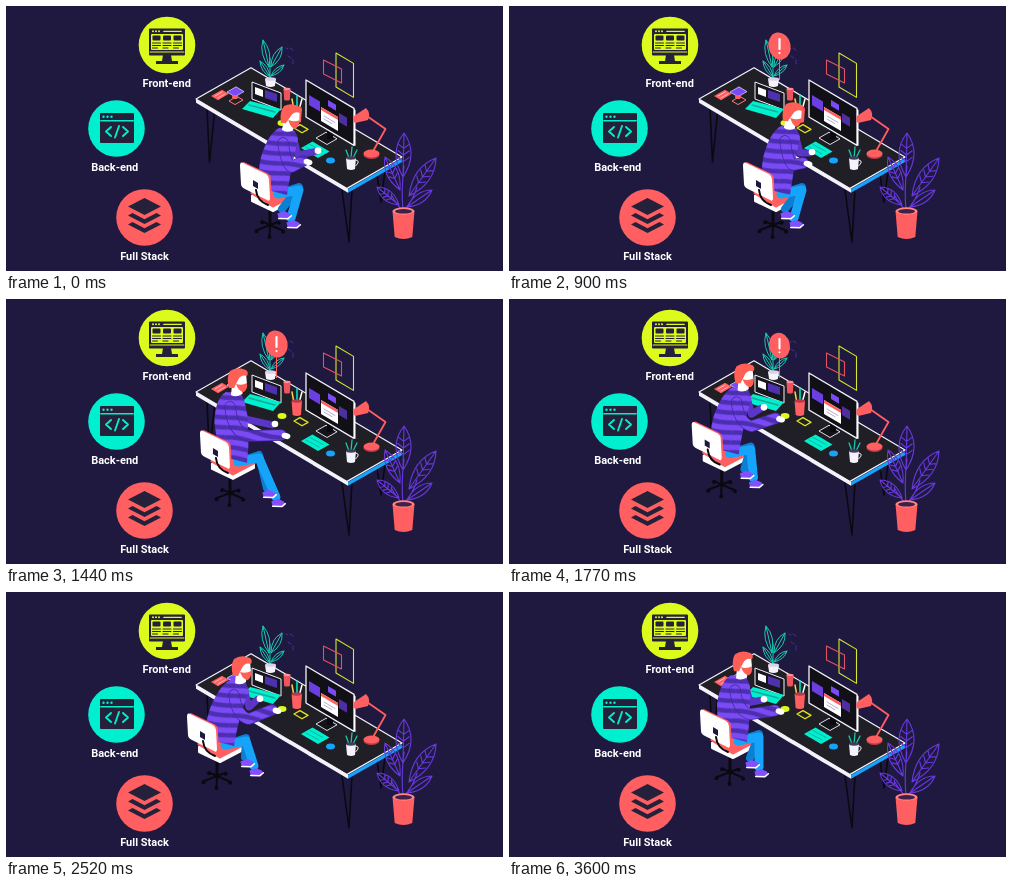
Recreate the animation shown at these times as an HTML page. Size 497 by 265 pixels, loop 3630 ms.

```html
<!DOCTYPE html>
<html lang="en">
<head>
<meta charset="utf-8">
<title>Developer at work</title>
<style>
html, body { margin: 0; width: 100%; height: 100%; overflow: hidden; background: #1f1940; }
svg { display: block; width: 100vw; height: 100vh; }
text { font-family: Roboto, Arial, sans-serif; font-weight: 600; font-size: 11px; fill: #fff; text-anchor: middle; }
.line { fill: none; stroke-linecap: round; stroke-linejoin: round; }
</style>
</head>
<body>
<svg viewBox="0 0 497 265">
  <defs>
    <pattern id="knit" width="60" height="10" patternUnits="userSpaceOnUse">
      <rect width="60" height="10" fill="#7a4af4"/>
      <path d="M0 4Q15 1 30 4T60 4" fill="none" stroke="#4c2eb0" stroke-width="4.5"/>
    </pattern>
  </defs>
  <g id="icons"></g>
  <g id="room"></g>
  <g id="alert">
    <path d="M0 12V34" stroke="#ff5f60"/>
    <ellipse rx="11" ry="13.7" transform="rotate(-12)" fill="#ff5f60"/>
    <path d="M0 -7V3M0 7v.1" class="line" stroke="#fff" stroke-width="2.2"/>
  </g>
  <g id="base"></g>
  <path id="legFar" class="line" stroke="#0b7fd2" stroke-width="8"/>
  <path id="legNear" class="line" stroke="#16a4fa" stroke-width="9"/>
  <g id="shoeFar"></g>
  <g id="shoeNear"></g>
  <path id="armFar" class="line" stroke="#5a35c8" stroke-width="7"/>
  <circle id="handFar" r="3.3" fill="#fff"/>
  <path id="torso" fill="url(#knit)"/>
  <path id="armEdge" class="line" stroke="#42289e" stroke-width="11.5"/>
  <path id="armNear" class="line" stroke="url(#knit)" stroke-width="10"/>
  <ellipse id="handNear" rx="4.5" ry="3" fill="#fff"/>
  <g id="head">
    <path d="M-6 6L-7 16Q-2 19 4 15L5 7L9 5 8 -6 -4 -7z" fill="#fff"/>
    <path d="M-9 9Q-12 -2 -8 -8Q-1 -13 8 -9Q11 -7 9 -3Q3 -5 0 1L-4 9Z" fill="#ff5f55"/>
    <path d="M-2 5Q4 7 9 4Q10 10 6 13Q1 13 -2 5Z" fill="#ff5f55"/>
  </g>
  <g id="back"></g>
</svg>
<script>
const LOOP = 3630;
const RED = '#ff5f60', TEAL = '#00efcf', LIME = '#dcfb1c', INK = '#26213a';
const VIOLET = '#7a4af4', WHITE = '#f4f2fa', BLACK = '#0a0910', BLUE = '#16a4fa';
const $ = id => document.getElementById(id);
const set = (id, name, value) => $(id).setAttribute(name, value);
const place = (id, x, y, more = '') => set(id, 'transform', `translate(${x} ${y})${more}`);
const clamp = v => Math.max(0, Math.min(1, v));

// Drawing helpers: each returns SVG markup.
const shape = (d, fill, edge = 'none', w = 1) =>
  `<path d="${d}" fill="${fill}" stroke="${edge}" stroke-width="${w}" stroke-linejoin="round"/>`;
const line = (d, color, w = 1) => `<path class="line" d="${d}" stroke="${color}" stroke-width="${w}"/>`;
const oval = (x, y, rx, ry, fill) => `<ellipse cx="${x}" cy="${y}" rx="${rx}" ry="${ry}" fill="${fill}"/>`;
const box = (x, y, w, h, fill) => `<rect x="${x}" y="${y}" width="${w}" height="${h}" rx="1" fill="${fill}"/>`;
const label = (x, y, s) => `<text x="${x}" y="${y}">${s}</text>`;
// A sheet lying on the desk, from its left corner.
const flat = (x, y, a, b, ...look) =>
  shape(`M${x} ${y}l${a} ${-.57 * a}l${b} ${.592 * b}l${-a} ${.57 * a}z`, ...look);
// An upright panel along the desk's long side.
const panel = (x, y, w, h, fill, edge, lw, k = .592) =>
  shape(`M${x} ${y}l${w} ${k * w}v${h}l${-w} ${-k * w}z`, fill, edge, lw);
const can = (x, y, w, h, fill, rim) =>
  shape(`M${x - w} ${y}h${2 * w}l${-w * .2} ${h}q${-w * .8} ${w * .35} ${-w * 1.6} 0z`, fill) +
  oval(x, y, w, w * .33, rim);

function leaf(x, y, tx, ty, w) {
  const dx = tx - x, dy = ty - y, len = Math.hypot(dx, dy);
  const nx = -dy / len * w, ny = dx / len * w;
  const at = (k, s) => `${x + dx * k + nx * s} ${y + dy * k + ny * s}`;
  let d = `M${at(0, 0)}Q${at(.55, 1)} ${at(1, 0)}Q${at(.55, -1)} ${at(0, 0)}L${at(1, 0)}`;
  if (w > 9) for (const k of [.35, .5, .65])
    d += `M${at(k + .1, .38)}L${at(k, 0)}L${at(k + .1, -.38)}`;
  return d;
}

const dots = (x, y, gap, r, fill) => [0, 1, 2].map(i => oval(x + i * gap, y, r, r, fill)).join('');
const badge = (x, y, fill) => oval(x, y, 28.3, 28.3, fill);
const card = x => box(x, 29.5, 8, 5, INK) + line(`M${x} 37h8m-8 2.5h8m-8 2.5h5`, INK);
const layer = y => shape(`M122 ${y}l4.5-2.4 12 6.2 12-6.2 4.5 2.4-16.5 8.5z`, INK);

$('icons').innerHTML = [
  badge(161, 39, LIME),
  box(143, 22.5, 36, 27, INK), box(145, 28, 32, 16, LIME), box(143.5, 45.6, 35, 1, LIME),
  shape('M157 49h8l1 6h6v3h-22v-3h6z', INK),
  dots(147, 25.3, 3, 1, LIME), box(157, 24.7, 19, 1.3, LIME),
  card(146.5), card(157), card(167.5),
  label(160.7, 81, 'Front-end'),
  badge(110.5, 122.5, TEAL),
  box(94, 107, 34, 30, INK), box(94, 114, 34, 1.5, TEAL), dots(97.5, 110.7, 4, 1.2, TEAL),
  line('M105 121l-5 4.5 5 4.5M117 121l5 4.5-5 4.5M113 120l-4 11.5', TEAL, 1.9),
  label(108.7, 165, 'Back-end'),
  badge(138.5, 211.5, RED),
  shape('M138.5 192l16.5 8.5-16.5 8.5-16.5-8.5z', INK), layer(209.5), layer(218.5),
  label(138.5, 253.5, 'Full Stack')
].join('');

const wall = panel(330, 47, 17.5, 34, 'none', '#d6e92c', 1.1) +
  panel(317.5, 54, 18, 14, 'none', '#e5525f', 1.1, .5) +
  line('M280 42l2 1M284 42l3 2M282 50l3 2M287 54v4', '#4b2ca2');

const desk = line('M201 103l2.5 53 5-49M336 184l7 52 3-53M371 169l4 27 4-31', BLACK, 1.6) +
  flat(190, 93, 55, 151, '#201f25', WHITE, 1.2) +
  panel(190, 93, 152, 3.8, WHITE) +
  panel(342, 183, 54, 3.8, BLUE, 'none', 1, -.57);

const papers = flat(205, 90, 11, 7, RED) + line('M209 90l7-4M212 92l7-4', '#ffb9b9') +
  flat(221, 86, 9, 8, VIOLET, '#e9ddff', .7) + flat(223, 95, 8, 6, 'none', '#ff7a7a') +
  oval(229, 91, 3, 2, RED);

const laptop = panel(246, 76, 29, 17, '#17151d', WHITE, 1, .38) +
  panel(249, 81, 8, 7, '#fff', 'none', 1, .38) + panel(259, 84, 12, 8, '#4e31ad', 'none', 1, .33) +
  shape('M236 103l8-8 31 8-8 9z', TEAL) + line('M243 99l26 7', '#16a994', 1.4);

const sprout = line('M264 73V52' + leaf(263, 61, 257, 34, 7) + leaf(265, 61, 276, 41, 7) +
  leaf(264, 71, 254, 55, 5) + leaf(265, 70, 278, 59, 5), '#19c9ae') +
  can(264.5, 73, 5.5, 7, WHITE, '#d9d3e6');

const pens = can(281, 83, 3.5, 11, '#ee5360', '#ff9292') +
  line('M288 104l-2-11', '#ffce57', 1.5) + line('M291 104v-15', TEAL, 1.5) + line('M293 104l3-11', '#fff', 1.5) +
  can(290.8, 102, 5.2, 14, RED, '#b83949') + oval(276, 117, 4.5, 3, LIME) +
  flat(288, 122, 6, 8, '#201f25', '#e5e41d', 1.3);

const monitor = flat(310, 132, 10, 11, '#15131a', WHITE, .9) + box(321, 122, 6, 11, BLACK) +
  panel(300, 74, 48, 37, '#111016', WHITE, 1.3) + panel(348, 103, 1.5, 36, '#fff') +
  panel(303, 89, 11, 10, '#6a3ee1') + panel(315, 101, 17, 14, '#fff') + panel(315, 101, 17, 3, RED) +
  panel(322, 94, 8, 6, VIOLET) + panel(333, 107, 8, 9, '#4d2f9f') +
  line('M318 110l11 6.5M318 113l8 4.7', '#b6afd2') +
  flat(295, 142, 11.5, 17, TEAL) + line('M300 141l13 7M304 138.5l13 7', '#0aa996', .8) +
  oval(324.5, 154.5, 4.5, 3, BLUE);

const lamp = oval(365.5, 149, 8, 4, '#b83949') + oval(365.5, 147.5, 8, 4, RED) +
  line('M366 147l13.5-24-20-14', RED, 1.8) + shape('M360 102q5 5 2 12l-13 3q-3-2-1-7z', RED);

const mug = line('M343 152l-3-8M345 152l1-11M347 152l4-8', '#19c9ae', 1.3) +
  line('M350 154q5 1-.5 6', WHITE) + can(345, 152, 5, 11, WHITE, '#463a5a');

const bush = line('M397 204Q395 185 398 160M398 204Q407 195 411 181M396 204Q389 196 386 190' +
  leaf(397, 171, 398, 127, 15) + leaf(403, 190, 430, 152, 14) + leaf(394, 184, 379, 151, 11) +
  leaf(393, 199, 371, 181, 10) + leaf(401, 201, 426, 184, 9), '#6738dc', 1.1) +
  can(397.5, 205, 11, 26, RED, '#ff8581') + oval(397.5, 205.3, 8.5, 2.3, '#40204a');

$('room').innerHTML = wall + desk + papers + laptop + sprout + pens + monitor + lamp + mug + bush;

// The chair turns around its stem; its five feet lie on a flattened ring.
const feet = [0, 1, 2, 3, 4].map(i => {
  const a = i * Math.PI * .4 + .35;
  return [221 + 14 * Math.cos(a), 183 + 8 * Math.sin(a)];
});
const rest = 'M194 118l23 11q3 2 3 5l1 19q0 4-3 2l-22-11q-4-2-4-5l-1-18q0-5 3-3z';
$('base').innerHTML = line('M221 164v17', BLACK, 3) +
  feet.map(([x, y]) => line(`M221 180L${x} ${y}`, BLACK, 2) + oval(x, y + 1, 2, 2, BLACK)).join('') +
  shape('M203 151l20-9 22 9v4l-21 11-21-10z', '#fff', '#fff', 2) +
  shape('M203 148l20-8 22 10-21 11z', RED, RED, 3);
$('back').innerHTML = `<g transform="translate(1.8 -.5)">${shape(rest, RED)}</g>` + shape(rest, '#fff') +
  panel(204, 135, 5, 6, '#1f1940') + line('M207 145q1 11 12 15', BLACK, 2);
for (const id of ['shoeFar', 'shoeNear']) $(id).innerHTML =
  shape('M-6 -3L1 -4 6 0Q8 4 3 4L-6 2Z', '#8450ff') + line('M-6 2L3 4.5 7 2.5', '#fff', 1.5);

// chair x y, head x y, near hand x y, far hand dx, near foot x y
const poses = {
  work:  [43, 39, 285, 109, 303, 156, 9, 287, 218],
  pause: [43, 39, 284, 107, 300, 158, 3, 287, 218],
  roll:  [3, 14, 232, 80, 281, 137, -12, 272, 204],
  lean:  [-9, 5, 236, 75, 272, 119, -18, 244, 183],
  sway:  [-10, 4, 236, 75, 272, 119, -18, 250, 180],
  settle: [0, 0, 234, 70, 272, 119, -17, 252, 181]
};
const beats = [[0, 'work'], [560, 'work'], [860, 'pause'], [1100, 'pause'], [1440, 'roll'], [1860, 'lean'],
  [2220, 'lean'], [2520, 'sway'], [2700, 'sway'], [3100, 'settle'], [LOOP, 'settle']];
const keys = beats.map(([t, name]) => [t, ...poses[name]]);

// Monotone slope, so that held poses stay still.
function slope(i, c) {
  if (i < 1 || i > keys.length - 2) return 0;
  const step = j => (keys[j + 1][c] - keys[j][c]) / (keys[j + 1][0] - keys[j][0]);
  const a = step(i - 1), b = step(i);
  return a * b > 0 ? 2 * a * b / (a + b) : 0;
}

function poseAt(t) {
  let i = 0;
  while (i < keys.length - 2 && t >= keys[i + 1][0]) i++;
  const a = keys[i], b = keys[i + 1], h = b[0] - a[0], u = (t - a[0]) / h, v = 1 - u;
  return a.slice(1).map((from, n) => {
    const c = n + 1;
    return v * v * (1 + 2 * u) * from + u * u * (3 - 2 * u) * b[c] +
      h * u * v * (v * slope(i, c) - u * slope(i + 1, c));
  });
}

function drawPerson(t) {
  let [cx, cy, hx, hy, nx, ny, reach, ax, ay] = poseAt(t);
  const typing = t < 560 || t > 3150 ? 1 : t > 1980 && t < 2700 ? .5 : 0;
  const fx = nx + reach, fy = ny - 12 + typing * Math.sin(t / 38 + 2.4);
  ny += typing * Math.sin(t / 38);
  hy += typing * .4 * Math.sin(t / 90);

  const sx = hx - 5, sy = hy + 15, px = cx + 225, py = cy + 147;
  const mx = (sx + px) / 2, my = (sy + py) / 2;
  place('base', cx, cy);
  place('back', cx, cy);
  place('head', hx, hy, ` rotate(${8 * clamp((hx - 236) / 48)})`);

  const leg = (x, y, dy) => `M${px + 4} ${py + 2}L${px + 25} ${py + dy}L${x - 2} ${y - 6}`;
  set('legNear', 'd', leg(ax, ay, -2));
  set('legFar', 'd', leg(ax - 9, ay - 9, -5));
  place('shoeNear', ax, ay, ' rotate(-14)');
  place('shoeFar', ax - 9, ay - 9, ' rotate(-14)');

  set('torso', 'd', `M${sx - 7} ${sy - 2}Q${sx - 18} ${sy + 4} ${mx - 19} ${my - 4}` +
    `Q${px - 17} ${py - 18} ${px - 14} ${py - 4}L${px + 13} ${py + 3}` +
    `Q${px + 17} ${my + 6} ${sx + 12} ${sy + 9}Q${sx + 9} ${sy - 3} ${sx + 2} ${sy - 1}Z`);
  set('knit', 'patternTransform', `translate(${sx} ${sy}) rotate(10)`);

  // The elbow hangs below the line from shoulder to hand.
  const ux = sx - 3, uy = sy + 13;
  const ex = ux + (nx - ux) * .33, ey = Math.max(uy + 20, ny - 4) + 4;
  const near = `M${ux} ${uy}Q${ux + 3} ${ey - 3} ${ex} ${ey}L${nx - 6} ${ny - 1}`;
  set('armEdge', 'd', near);
  set('armNear', 'd', near);
  set('armFar', 'd', `M${sx + 8} ${sy + 10}L${sx + 12} ${sy + 25}L${fx - 3} ${fy + 1}`);
  place('handNear', nx - 1, ny, ' rotate(15)');
  place('handFar', fx, fy);
}

function drawAlert(t) {
  const u = clamp((t - 620) / 240) - 1;
  const size = (1 + 2.7 * u * u * u + 1.7 * u * u) * clamp((1960 - t) / 200);
  const drift = clamp((t - 900) / 540);
  const y = 40 + 5 * drift * drift * (3 - 2 * drift);
  set('alert', 'visibility', size > .01 ? 'visible' : 'hidden');
  place('alert', 270.5, 74 + (y - 74) * size, ` scale(${size})`);
}

function tick() {
  const t = performance.now() % LOOP;
  drawPerson(t);
  drawAlert(t);
  requestAnimationFrame(tick);
}
tick();
</script>
</body>
</html>
```
